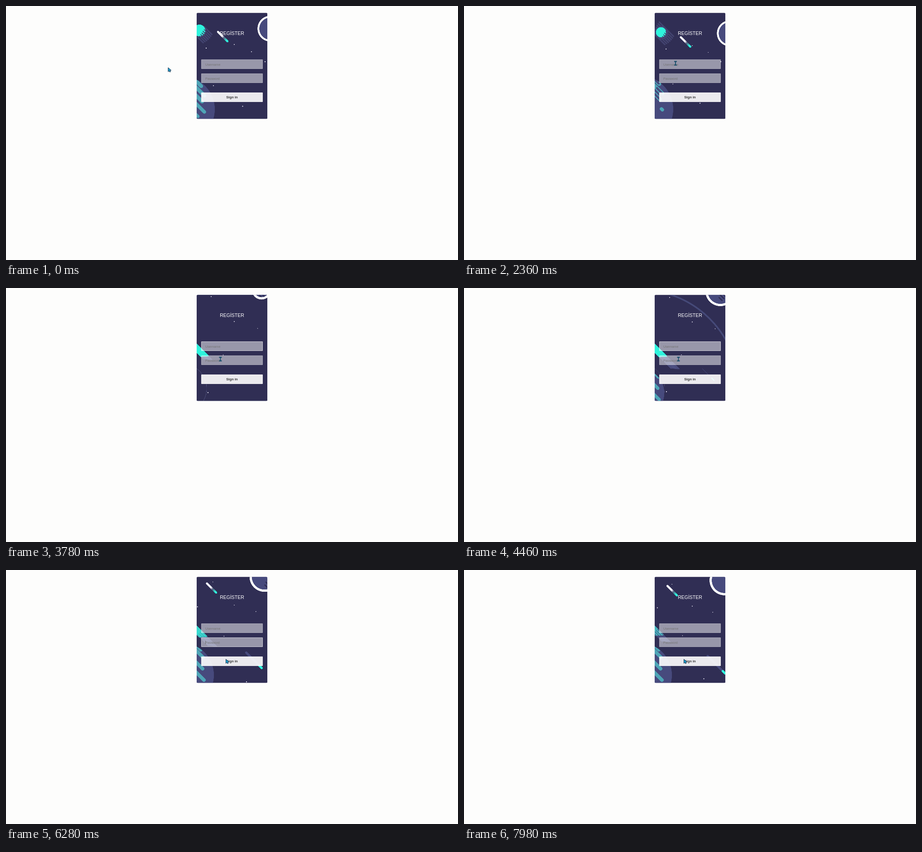
Recreate the animation shown at these times as an HTML page with a canvas. Size 998 by 561 pixels, loop 8 s.

```html
<!DOCTYPE html>
<html lang="tr">
<head>
<meta charset="utf-8">
<title>Register</title>
<style>
  html, body { margin: 0; width: 100%; height: 100%; overflow: hidden; background: #fdfdfc; }
  body { position: relative; font-family: "Liberation Sans", Arial, sans-serif; }
  canvas { position: absolute; left: 420px; top: 15px; width: 158px; height: 235px; }
  .title, .field, .button { position: absolute; box-sizing: border-box; white-space: nowrap; }
  .title { left: 421px; top: 54px; width: 156px; text-align: center; font-size: 10.5px; line-height: 12px; color: #fff; }
  .field, .button { left: 431px; width: 136px; height: 21px; border-radius: 1px; }
  .field { padding: .5px 0 0 8px; border: 1px solid rgba(255,255,255,.15); background: rgba(255,255,255,.5); color: #757575; font-size: 7.25px; line-height: 19px; }
  .user { top: 118px; }
  .pass { top: 149px; }
  .focus { border-color: rgba(255,255,255,.5); }
  .caret { position: absolute; left: 8px; top: 6px; width: 1px; height: 8px; background: #777; visibility: hidden; }
  .button { top: 191px; background: rgba(255,255,255,.9); text-align: center; font: bold 7.65px/21px "Liberation Sans", Arial, sans-serif; color: #333; }
  svg { position: absolute; left: 0; top: 0; width: 12px; height: 14px; overflow: visible; }
</style>
</head>
<body>
<canvas width="632" height="940"></canvas>
<div class="title">REGİSTER</div>
<div class="field user">Username<i class="caret"></i></div>
<div class="field pass">Password<i class="caret"></i></div>
<div class="button">Sign in</div>
<svg>
  <path id="arrow" d="M0 0V9.2L2.2 7.4L3.8 10L5.4 9.1L4 6.6L6.7 6Z" fill="#1b9fd0" stroke="#14223a" stroke-width=".9"/>
  <path id="beam" d="M-3 -4H3M0 -4V4M-3 4H3" fill="none" stroke="#124b68" stroke-width="1.8"/>
</svg>
<script>
const LOOP = 8, SCALE = 4, SECOND_SCENE = 4.46;
const NIGHT = '#302e54', PURPLE = '#474a7d', TEAL = '#4ea5b6', BRIGHT = '#2ff3dc', WHITE = '#fff';
const CENTER = [388, 222];
const $ = s => document.querySelector(s);
const ctx = $('canvas').getContext('2d');

function ease(t, start, duration) {
  const p = Math.min(1, Math.max(0, (t - start) / duration));
  return p * p * (3 - 2 * p);
}

function circle(x, y, r) {
  ctx.beginPath();
  ctx.arc(x, y, Math.max(r, 0), 0, 2 * Math.PI);
}

function disc(x, y, r, fill) {
  circle(x, y, r);
  ctx.fillStyle = fill;
  ctx.fill();
}

function ring(x, y, r, color, width) {
  if (r <= 0) return;
  circle(x, y, r);
  ctx.strokeStyle = color;
  ctx.lineWidth = width;
  ctx.stroke();
}

function line(x1, y1, x2, y2, color, width) {
  if (width <= 0) return;
  ctx.beginPath();
  ctx.moveTo(x1, y1);
  ctx.lineTo(x2, y2);
  ctx.strokeStyle = color;
  ctx.lineWidth = width;
  ctx.lineCap = 'round';
  ctx.stroke();
}

function group(draw) {
  ctx.save();
  draw();
  ctx.restore();
}

function inside(x, y, r, draw) {
  group(() => {
    circle(x, y, r);
    ctx.clip();
    draw();
  });
}

// Local x axis runs down and to the right.
function diagonal(x, y, draw) {
  group(() => {
    ctx.translate(x, y);
    ctx.rotate(Math.PI / 4);
    draw();
  });
}

// Uneven but repeatable streak lengths, 0 to 1.
const jitter = i => (Math.sin(i * 12.9) + 1) / 2;

function sky() {
  ctx.fillStyle = NIGHT;
  ctx.fillRect(420, 15, 158, 235);
}

function stars(points, age) {
  points.forEach(([x, y], i) => {
    const shrink = 1 - .0295 * age;
    disc(504 + (x - 504) * shrink, 122 + (y - 122) * shrink, .8 + .3 * (i % 2), '#e6e4f2');
  });
}

const firstStars = [[504, 85], [442, 93], [458, 176], [572, 123], [542, 101], [522.5, 221.5]];
const secondStars = [[504, 75], [418, 79], [454, 21], [532.5, 254], [554.5, 90], [447, 229], [480, 147.5]];

function moon(x, y, r, width, shift) {
  disc(x, y, r, PURPLE);
  inside(x, y, r, () => diagonal(x, y, () => {
    for (let i = -2; i <= 2; i++) line(shift + i * i, i * 6, shift + 13, i * 6, NIGHT, 2.8);
  }));
  ring(x, y, r - width / 2, WHITE, width);
}

function comet(x, y, length, width) {
  const tx = x - length, ty = y - length;
  const glow = ctx.createLinearGradient(tx, ty, x, y);
  glow.addColorStop(.45, '#f2f2fa');
  glow.addColorStop(.62, '#57607f');
  glow.addColorStop(.9, BRIGHT);
  line(tx, ty, x, y, glow, width);
}

// Rounded bars, each reaching 30px up and left of its tip.
function bars(tips, place, width) {
  for (const tip of tips) {
    const [x, y] = place(...tip);
    line(x - 32, y - 32, x, y, TEAL, width);
  }
}

function firstPlanet(t) {
  const rise = 2 * t, open = 4.5 * ease(t, .8, 1.5), left = 1 - ease(t, 0, 2.4);
  disc(388, 228, 73 + t * .4, PURPLE);
  inside(388, 228, 73 + t * .4, () => {
    const tips = [[431, 177], [438, 198], [433, 211]];
    bars(tips, (x, y) => [x, y - rise], 8.5);
    for (const [x, y] of tips) line(x - 12, y - 12 - rise, x - 1, y - 1 - rise, PURPLE, open);
    line(436 - 28 * left, 232 - 28 * left - rise, 438, 234 - rise, TEAL, 7.5);
    line(414, 234, 424, 244, TEAL, 7 * left);
  });
}

function secondPlanet(t) {
  const r = 71 * ease(t, 3.4, 1.55), grown = ease(t, 4, 1.1);
  ring(...CENTER, 55, '#5c5e8c', .6 * (1 - grown));
  disc(388, 232, r, PURPLE);
  inside(388, 232, r, () => {
    const back = 14 * (1 - grown);
    bars([[430, 176], [435, 193], [434, 218], [437, 243]], (x, y) => [x - back * .7, y + back * .4], 8 * ease(t, 3.9, .7));
  });
}

function streakyPlanet(t) {
  const x = 428 + 3.4 * t, y = 55 + 1.7 * t, spread = ease(t, .3, 2.6);
  disc(x, y, 13 + spread * 2, '#46487a');
  diagonal(x, y, () => {
    for (let i = -3; i <= 3; i++)
      line(-23 * spread + 8 * jitter(i), i * 4.4, 17 + 9 * jitter(i + 5), i * 4.4, '#42436f', 3.2);
  });
  disc(x - 1, y - 1, 13 - spread * 2, BRIGHT);
  diagonal(x, y, () => {
    for (let i = -2; i <= 2; i++) line(4 + 5 * jitter(i), i * 4.4, 14, i * 4.4, '#42436f', 1.8);
  });
}

// All portal edges follow one curve, each with its own delay.
const portal = (t, delay) => 300 * ease(t, 2.72 + delay, .9);
const holeRadius = t => portal(t, .25);

function firstScene(t) {
  sky();
  firstPlanet(t);
  ring(...CENTER, portal(t, 0), TEAL, 3.5);
  disc(...CENTER, portal(t, .05), TEAL);
  disc(...CENTER, portal(t, .17), '#4b4b7b');
  const hole = holeRadius(t);
  if (hole > 0) {
    ring(...CENTER, hole + 20, NIGHT, .7);
    ring(...CENTER, hole + 11, TEAL, 7);
    ring(...CENTER, hole + 5.5, NIGHT, 1);
  }
  stars(firstStars, t);
  moon(583.8 + 1.3 * t, 50 + 4.4 * t, 28.5, 4, 10 - 3 * t);
  streakyPlanet(t);
  comet(489 + 4.5 * t, 78 + 5 * t, 21, 4.5);
}

function leftComet(t, age) {
  const late = Math.max(0, age);
  const tail = 76 * ease(t, 3.2, 1) - 8 * late, core = 36 * ease(t, 2.7, 1.2) - 3 * late;
  diagonal(418, 130, () => {
    for (let i = -3; i <= 3; i++) {
      const v = i * 2, cut = jitter(i);
      line(-15, v, Math.max(0, tail - 16 * cut), v, '#52568a', 1.6);
      line(-15, v, core - 12 * cut, v, BRIGHT, 2.6);
      ctx.globalAlpha = .8 * ease(t, 5, 3);
      line(-15, v, core - 12 * cut, v, TEAL, 2.6);
      if (i % 2) line(core - 18, v, core, v, PURPLE, 1.4);
      ctx.globalAlpha = 1;
    }
  });
}

function rightComet(t, age) {
  const x = 552 + 6.9 * age, tail = 526 + 4.4 * Math.max(0, age - .8);
  const shown = ease(t, 3.8, .5), width = shown * (.8 + 4.2 * ease(t, 4.4, .8));
  line(tail, tail - 348, x, x - 348, PURPLE, width);
  line(x - 5, x - 353, x, x - 348, BRIGHT, shown * (2 + 3 * ease(t, 4.4, .8)));
}

function topComet(t, age) {
  const shown = ease(t, 5.2, 1.2), x = 457.5 + 3.6 * age;
  comet(x, x - 414, 3 + 18 * shown, 4.5 * shown);
}

function secondScene(t) {
  const age = t - SECOND_SCENE;
  sky();
  ring(...CENTER, portal(t, 1.15), '#454978', 3.5);
  stars(secondStars, age);
  secondPlanet(t);
  moon(566 + 2.6 * age, 7 + 4.5 * age, 33 * ease(t, 3.3, .8), 5, 4 + 3 * age);
  leftComet(t, age);
  rightComet(t, age);
  topComet(t, age);
}

const hops = [
  { start: .05, time: 1.2, x: 109, y: -9.5 },
  { start: 2.5, time: 1.3, x: 6.5, y: 30.5 },
  { start: 4.8, time: .6, x: 1, y: 21 },
  { start: 5.5, time: .8, x: 11, y: 19 }
];

function pointer(t) {
  let x = 358, y = 136;
  for (const hop of hops) {
    const p = ease(t, hop.start, hop.time);
    x += hop.x * p;
    y += hop.y * p;
  }
  const inField = x > 431 && (y > 118 && y < 139 || y > 149 && y < 170);
  $('#arrow').style.display = inField ? 'none' : '';
  $('#beam').style.display = inField ? '' : 'none';
  $('svg').style.transform = `translate(${x}px, ${y}px)`;
}

function focus(name, t, from, to) {
  const on = t > from && t < to, field = $(name);
  field.classList.toggle('focus', on);
  field.firstElementChild.style.visibility = on && (t - from) % 1 < .5 ? 'visible' : 'hidden';
}

function frame(now) {
  const t = now / 1000 % LOOP, hole = holeRadius(t);
  ctx.setTransform(SCALE, 0, 0, SCALE, -420 * SCALE, -15 * SCALE);
  ctx.clearRect(420, 15, 158, 235);
  group(() => {
    ctx.beginPath();
    ctx.roundRect(421, 15.4, 156, 234, 2);
    ctx.clip();
    if (hole < 300) firstScene(t);
    if (hole > 0) inside(...CENTER, hole, () => secondScene(t));
  });
  pointer(t);
  focus('.user', t, 2.9, 4.8);
  focus('.pass', t, 4.8, 7.5);
  requestAnimationFrame(frame);
}
requestAnimationFrame(frame);
</script>
</body>
</html>
```
